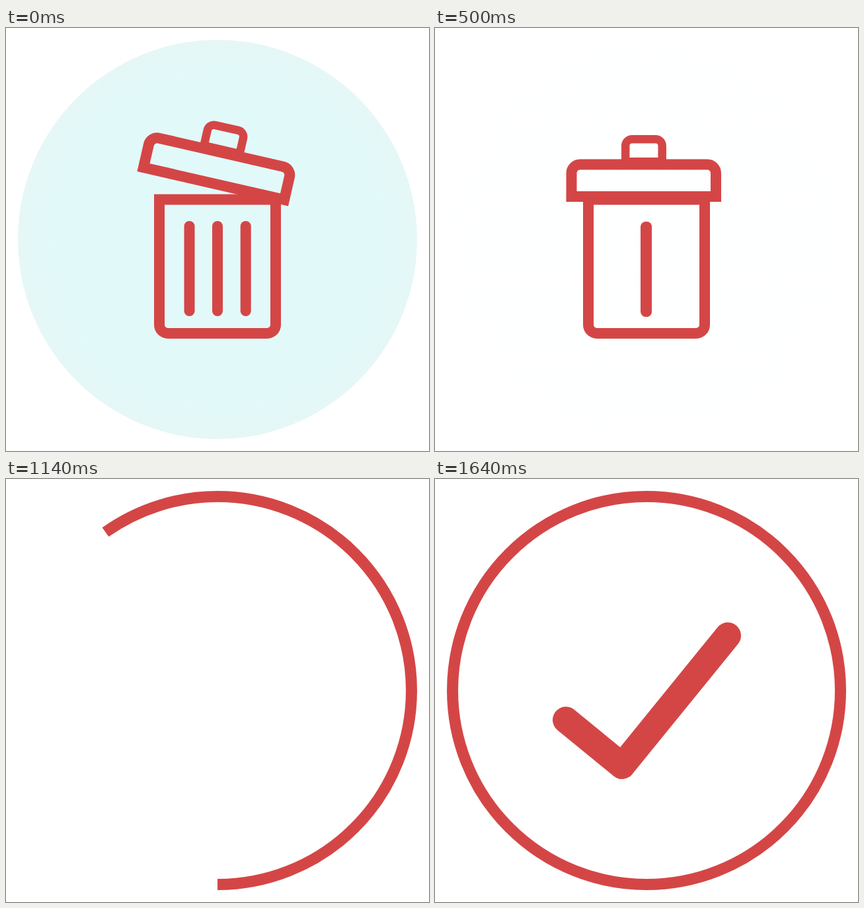
Recreate the animation shown at these times as an HTML page. Size 640 by 640 pixels, loop 2.43 s.

```html
<!DOCTYPE html>
<html lang="en">
<head>
<meta charset="utf-8">
<title>Delete confirmation</title>
<style>
  html, body { margin: 0; width: 100%; height: 100%; overflow: hidden; background: #fff; }
  svg { display: block; width: 100%; height: 100%; }
</style>
</head>
<body>
<svg viewBox="0 0 640 640" fill="none" stroke="#d44646" stroke-width="16">
  <defs>
    <radialGradient id="tint">
      <stop offset=".82" stop-color="#e2f9fa"/>
      <stop offset="1" stop-color="#e5f7f6"/>
    </radialGradient>
  </defs>
  <circle id="disc" cx="320" cy="320" r="302" fill="url(#tint)" stroke="none"/>
  <g id="bin">
    <path d="M232 259.5H408V449a13 13 0 0 1-13 13H245a13 13 0 0 1-13-13Z"/>
    <g stroke-linecap="round">
      <path id="left" d="M277.5 300V428"/>
      <path id="mid" d="M320 300V428"/>
      <path id="right" d="M362.7 300V428"/>
    </g>
    <g id="lid">
      <path d="M206.5 255V219.5a13 13 0 0 1 13-13H412a13 13 0 0 1 13 13V255Z"/>
      <path stroke-width="12.5" d="M288.2 202.2V178.3a10 10 0 0 1 10-10H333.7a10 10 0 0 1 10 10V202.2Z"/>
    </g>
  </g>
  <path id="ring" stroke-width="17" pathLength="1"
    d="M320 613.5A293.5 293.5 0 0 0 320 26.5A293.5 293.5 0 0 0 320 613.5"/>
  <path id="check" stroke-width="40" stroke-linecap="round" stroke-linejoin="round" pathLength="1"
    d="M198 364.5L283 434L443 237"/>
</svg>
<script>
const LOOP = 2430, FPS = 14, LAST = 23;
const $ = id => document.getElementById(id);
const [disc, bin, lid, left, mid, right, ring, check] =
  ['disc', 'bin', 'lid', 'left', 'mid', 'right', 'ring', 'check'].map($);

const span = (t, from, to) => Math.min(1, Math.max(0, (t - from) / (to - from)));
const sine = p => (1 - Math.cos(Math.PI * p)) / 2;
const shift = (el, x, y) => el.setAttribute('transform', `translate(${x} ${y})`);

// Show the part of a unit-length path between a and b
function trim(el, a, b) {
  el.style.display = b > a ? '' : 'none';
  el.setAttribute('stroke-dasharray', b - a >= 1 ? 'none' : `${b - a} 2`);
  el.setAttribute('stroke-dashoffset', -a);
}

function draw(t) {
  disc.setAttribute('opacity', 1 - span(t, 214, 508));

  const tilt = 12.9 * (1 - sine(span(t, 0, 286)));
  lid.setAttribute('transform', `rotate(${tilt} 401.5 239.7)`);

  const merge = sine(span(t, 214, 500));
  shift(left, 41.5 * merge, merge);
  shift(mid, 0, merge);
  shift(right, -42.7 * merge, merge);
  bin.setAttribute('opacity', 1 - span(t, 500, 643));

  trim(ring, 0, span(t, 562, 1218.5) ** 4.2);

  const rest = (1 - span(t, 1214.3, 1642.8)) ** 3.6;
  trim(check, 0.0075 * rest, 1 - rest);
}

const start = performance.now();
function tick() {
  const now = (performance.now() - start) % LOOP;
  const step = Math.min(LAST, Math.floor((now + 5) * FPS / 1000));
  draw(step * 1000 / FPS);
  requestAnimationFrame(tick);
}
tick();
</script>
</body>
</html>
```
